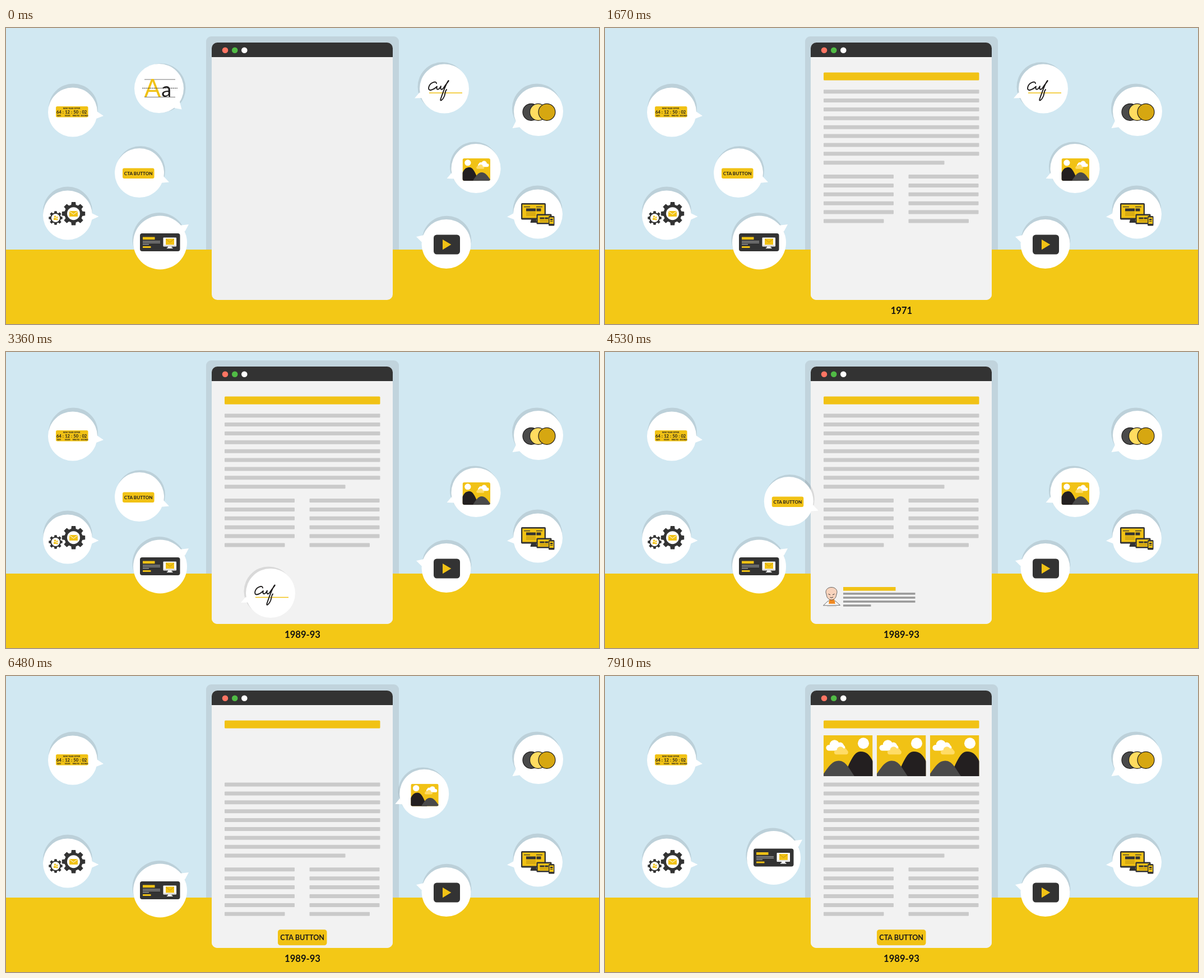
An HTML page for the animation above (8000 ms loop, 1058 by 529 pixels).

```html
<!DOCTYPE html>
<html lang="en">
<head>
<meta charset="utf-8">
<title>Email design timeline</title>
<style>
html, body { margin: 0; width: 100%; height: 100%; overflow: hidden; background: #d1e8f2; }
svg { display: block; width: 100vw; height: 100vh; }
text { font-family: Lato, sans-serif; font-weight: 700; text-anchor: middle; fill: #1d1b1b; }
</style>
</head>
<body>
<svg id="stage" viewBox="0 0 1058 529"></svg>
<script>
const YELLOW = '#f1c215', DARK = '#333', LINE = '#cacaca';
const LOOP = 8000, STEP = 130, FIRST = 500;

// Markup helpers
const rect = (x, y, w, h, fill, r = 0) =>
  `<rect x="${x}" y="${y}" width="${w}" height="${h}" rx="${r}" fill="${fill}"/>`;
const disc = (x, y, r, fill, extra = '') =>
  `<circle cx="${x}" cy="${y}" r="${r}" fill="${fill}" ${extra}/>`;
const path = (d, fill, extra = '') => `<path d="${d}" fill="${fill}" ${extra}/>`;
const stroke = (d, color, width, extra = '') =>
  path(d, 'none', `stroke="${color}" stroke-width="${width}" ${extra}`);
const label = (x, y, size, str, extra = '') =>
  `<text x="${x}" y="${y}" font-size="${size}" ${extra}>${str}</text>`;
const group = (id, body, extra = '') => `<g id="${id}" ${extra}>${body}</g>`;
const rows = (n, fn) => Array.from({ length: n }, (_, i) => fn(i)).join('');

function gear(x, y, outer, inner, hole) {
  const pts = [];
  for (let i = 0; i < 8; i++) {
    for (const [r, a] of [[inner, -.26], [outer, -.17], [outer, .17], [inner, .26]]) {
      const angle = i * Math.PI / 4 + a;
      pts.push((x + r * Math.cos(angle)).toFixed(2) + ' ' + (y + r * Math.sin(angle)).toFixed(2));
    }
  }
  return path('M' + pts.join('L') + 'Z', DARK) + disc(x, y, hole, '#fff');
}

const envelope = (x, y, w, h) => rect(x, y, w, h, YELLOW, .8) +
  stroke(`M${x} ${y + .5}L${x + w / 2} ${y + h * .6}L${x + w} ${y + .5}`, '#fff', 1);

const cloud = (x, y, s, fill) => `<g transform="translate(${x} ${y}) scale(${s})">` +
  rect(0, 9, 34, 10.5, fill, 5.2) + disc(15, 9, 8.7, fill) + disc(25, 11, 6.5, fill) + '</g>';

// Landscape, 87.5 x 73
const landscape = r => `<g clip-path="url(#pic${r})">` +
  rect(0, 0, 87.5, 73, YELLOW) + disc(71, 14.3, 10, '#fff') +
  cloud(4.5, 8, 1, '#fff') + cloud(19, 20, .73, '#ffdc66') +
  path('M36 73C48 46 54 29 66 29S84 36 92 56V73Z', '#231f20') +
  path('M-3 73C9 56 15 45.5 27 45.5S45 58 55 73Z', '#4a4a4a') + '</g>';

const icons = {
  timer: rect(89, 140, 57.5, 19.5, YELLOW, 2.5) + label(117, 144.6, 3.6, 'NEW YEAR OFFER') +
    ['64', '12', '50', '02'].map((n, i) => label(94.5 + i * 15.1, 153, 7.6, n) +
      (i < 3 ? label(102 + i * 15.2, 152.5, 7, ':') : '') +
      label(94.5 + i * 15.2, 157.6, 2.8, ['DAYS', 'HOURS', 'MINUTES', 'SECONDS'][i])).join(''),

  type: stroke('M247 92H302M247 123.5H302', '#777', 1) +
    label(261.5, 123.3, 43.5, 'A', `style="font-weight:400;fill:${YELLOW}"`) +
    label(286.2, 123.3, 36, 'a', 'style="font-weight:400"') +
    stroke('M243 107.5H306', '#444', 1, 'stroke-dasharray="2.6 .8"'),

  cta: rect(208, 250.5, 56.5, 18.5, YELLOW, 3) + label(236.2, 262.8, 8.15, 'CTA BUTTON'),

  gears: gear(120.5, 331.7, 21, 16.3, 11.5) + envelope(113, 327, 15, 10) +
    gear(88.5, 339.5, 12.4, 9.6, 7.6) +
    disc(87.5, 337, 1.7, YELLOW) + disc(91, 338.5, 1.4, YELLOW) +
    rect(85, 339.5, 4.5, 3.5, YELLOW, 1) + rect(89.5, 340.8, 3, 2.8, YELLOW, 1),

  card: rect(239, 367, 71.5, 32, DARK, 4) + rect(244, 373.5, 21.5, 4.7, YELLOW) +
    rect(244, 380.5, 31, 1.4, '#999') + rect(244, 383.2, 31, 1.4, '#999') +
    rect(244, 386, 11, 1.4, '#999') + rect(244, 390, 14.5, 3, YELLOW, .5) +
    rect(280.5, 374.5, 23.5, 16, '#fff', 1) + rect(285, 376.5, 15, 10.8, YELLOW) +
    stroke('M285 377L292.5 383L300 377', '#b88f0c', .8) +
    rect(281.5, 388.2, 21.5, .6, '#999') + rect(289, 390.5, 6.5, 2.5, '#fff') + rect(287, 392.6, 10.5, 1.4, '#fff', .5),

  sign: stroke('M755 116H814', YELLOW, 1.3) +
    stroke('M768 99C768 94 757 97 754.5 105C752 114 761 112 769 104.5C767 110 771 113 776 104' +
      'C774 111 778 112 782 105C786 99 791 94 789.5 94C786 97 780 114 775.5 127' +
      'C774 132 779 129 782 122C784 117 783 113 786 110', '#1d1b1b', 1.9,
      'stroke-linecap="round" stroke-linejoin="round"'),

  palette: [[937, '#4a4a4a'], [949.5, '#ffdc60'], [965, '#d6a711']]
    .map(([x, c]) => disc(x, 150.3, 15, c, 'stroke="#1d1b1b" stroke-width="1.2"')).join(''),

  photo: `<g transform="translate(864 233) scale(-.565 .55)">${landscape(6)}</g>`,

  devices: rect(919, 313, 44, 29.5, DARK, 2) + rect(921.3, 315.5, 39.4, 24, YELLOW) +
    rect(924, 319, 11, 1.2, DARK) + rect(946, 319, 11, 1.2, DARK) +
    rect(928, 322.5, 17, 5, DARK) + rect(946.5, 322.5, 8, 5, DARK) +
    rows(3, i => rect(928, 329.5 + i * 2.5, 17, 1, '#b58b0c')) +
    path('M937 342H946L947.5 348H935.5Z', DARK) +
    rect(946.5, 332.5, 27, 18, DARK, 1.5) + rect(948.7, 335, 22, 13, YELLOW) +
    rect(952.5, 338.5, 8, 3, DARK) + rect(961.5, 338.5, 6, 3, DARK) +
    rows(2, i => rect(952.5, 343.2 + i * 2, 15, 1, '#b58b0c')) +
    rect(968, 336, 10.5, 17.5, DARK, 1.5) + rect(969.5, 338.5, 7.5, 11.5, YELLOW) +
    rect(971, 341, 4.5, 2.5, DARK) + rect(971, 345, 4.5, 1, DARK),

  video: rect(763, 369.5, 47, 35, DARK, 5.5) + path('M779 378L794.3 387L779 396.3Z', YELLOW)
};

// name: centre, shadow offset, tail points, radius
const bubbles = {
  timer:   [119, 150.5, 1, -7, '162 149 174 157 161 162'],
  type:    [273, 108, 3.5, -.7, '300 143 313.5 145.5 309.5 130'],
  cta:     [238, 259, 2, -4, '280 264 291 275.5 274 277'],
  gears:   [110, 334.5, 0, -7, '153 331 165.5 337 152 343'],
  card:    [275, 383.5, -1.5, -5.5, '309 353 326 351 319 364', 48],
  sign:    [782, 108.5, -3.5, -3.5, '738 115 729 125.5 744 125'],
  palette: [950, 149, -3, -5.5, '910 166 903.5 179 918 177'],
  photo:   [838.5, 251, -2.5, -3.5, '795 259 786.5 269 800 269.5'],
  devices: [949, 332.5, -.5, -7, '906 331 894 337.5 906 342'],
  video:   [785.5, 386, .8, -6.3, '746 370 732 373 742 383']
};

const bubble = ([name, [x, y, dx, dy, tail, r = 44]]) => group(name,
  disc(x + dx, y + dy, r, '#000', 'opacity=".1"') +
  disc(x, y, r, '#fff') + `<polygon points="${tail}" fill="#fff"/>` + icons[name]);

const column = x => rows(6, i => rect(x, 262 + i * 15.9, i < 5 ? 125 : 107.5, 7, LINE, 1));

const avatar = path('M389.5 453L398 445H411L419.5 452.5Z', '#fff', 'stroke="#444" stroke-width=".8"') +
  path('M399 450L400.5 442H409L411 450Z', '#f08a24') +
  path('M404 420.5C412 420.5 416 427 413 433C412.5 440 408 443 404 443S395.5 440 395 433C392 427 396 420.5 404 420.5Z',
    '#f8d3bd', 'stroke="#444" stroke-width=".8"') +
  stroke('M398.5 432.5L402 434M409.5 432.5L406 434M401.5 438.5Q404 440 407 438', '#333', 1) +
  stroke('M396 454.7H413', '#bbb', .7);

const page = rect(367, 52, 323, 440, '#f2f2f2') + rect(390, 79.5, 277.5, 14, YELLOW, 1.5) +
  group('flow',
    rows(9, i => rect(390, 110.2 + i * 15.88, i < 8 ? 277.5 : 215.5, 7, LINE, 1)) +
    column(390) + column(541.5) +
    group('button', rect(485, 373, 87.5, 28, YELLOW, 4.5) + label(528.7, 391.6, 12.6, 'CTA BUTTON')) +
    group('footer', avatar + rect(425, 420, 93.5, 6.7, YELLOW) +
      rows(4, i => rect(425, 430.2 + i * 7.05, i < 3 ? 128.5 : 49.5, 3.5, '#999')))) +
  group('pics', rows(3, i => `<g transform="translate(${390 + i * 95} 106)">${landscape(0)}</g>`));

const stage = document.getElementById('stage');
stage.innerHTML = `<defs>
  <clipPath id="pic0"><rect width="87.5" height="73"/></clipPath>
  <clipPath id="pic6"><rect width="87.5" height="73" rx="6"/></clipPath>
  <clipPath id="sheet"><rect x="367" y="26" width="323" height="460" rx="10"/></clipPath></defs>` +
  rect(0, 0, 1058, 529, '#d1e8f2') + rect(357, 15, 344, 400, '#c1d4dd', 9) +
  rect(0, 396, 1058, 133, '#f3c816') +
  `<g clip-path="url(#sheet)">` + rect(367, 26, 323, 460, '#f0f0f0') +
  group('page', page) + rect(367, 26, 323, 26, DARK) + '</g>' +
  disc(391, 39.7, 5.3, '#ff7563') + disc(408.2, 39.7, 5.3, '#50bb45') + disc(425.3, 39.7, 5.3, '#fff') +
  label(529, 511.4, 16.6, '', 'id="year" style="fill:#111"') +
  Object.entries(bubbles).map(bubble).join('');

const $ = id => document.getElementById(id);
const ramp = (t, a, b) => Math.min(1, Math.max(0, (t - a) / (b - a)));
const fade = (id, value) => $(id).setAttribute('opacity', value);

// name, start, end, ease-out power, control point, end point, fade start, fade end
const flights = [
  ['type', 370, 890, 1, 399.7, 189, 526.5, 270, 1280, 1670],
  ['sign', 1750, 3360, 1.59, 568, 272, 472, 431, 3750, 4140],
  ['cta', 4270, 5110, 1, 383, 249, 528, 386, 5180, 5570],
  ['photo', 6220, 7060, 1, 692, 181, 529, 142, 7060, 7390],
  ['card', 7650, 7910, 1, 288, 354.3, 301, 325, 9000, 9100]
];

function render(now) {
  const ms = now % LOOP;
  const t = ms < FIRST ? 0 : FIRST + STEP * Math.floor((ms - FIRST) / STEP);

  for (const [id, start, end, power, cx, cy, ex, ey, out, gone] of flights) {
    const [x, y] = bubbles[id];
    const p = 1 - (1 - ramp(t, start, end)) ** power;
    const bend = (c, e) => 2 * p * (1 - p) * c + p * p * e;
    $(id).setAttribute('transform', `translate(${bend(cx - x, ex - x)} ${bend(cy - y, ey - y)})`);
    fade(id, 1 - ramp(t, out, gone));
  }

  fade('page', ramp(t, 1280, 1670));
  fade('footer', ramp(t, 3750, 4140));
  fade('pics', ramp(t, 7130, 7520));
  const pop = ramp(t, 5180, 5700);
  fade('button', Math.min(1, pop * 2));
  $('button').setAttribute('transform',
    `translate(528.7 387) scale(${.65 + .35 * pop}) translate(-528.7 -387)`);
  $('flow').setAttribute('transform', `translate(0 ${80.3 * ramp(t, 6220, 6480)})`);
  $('year').textContent = t < 890 ? '' : t < 2840 ? '1971' : '1989-93';
}

const origin = performance.now();
function tick() {
  render(performance.now() - origin);
  requestAnimationFrame(tick);
}
tick();
</script>
</body>
</html>
```
